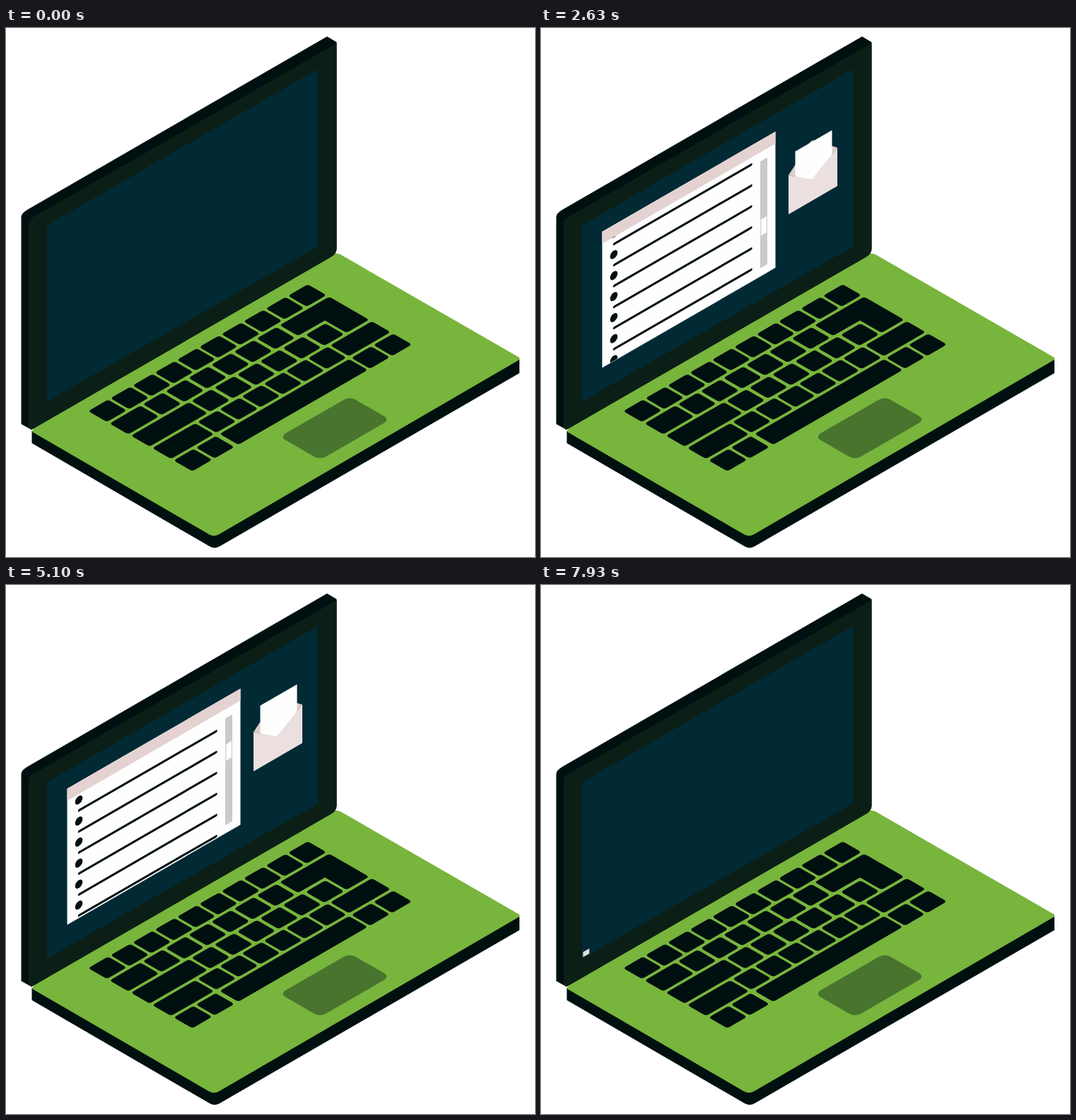
These frames come from a looping animation (748 px wide and 748 px high, 8.01 s). An HTML page:

```html
<!DOCTYPE html>
<html lang="en">
<head>
<meta charset="utf-8">
<title>Laptop</title>
<style>
html, body { margin: 0; width: 100%; height: 100%; overflow: hidden; background: #fff; }
svg { display: block; width: 100vw; height: 100vh; }
</style>
</head>
<body>
<svg viewBox="0 0 748 748">
  <defs><clipPath id="page"><rect y="17" width="245" height="175"/></clipPath></defs>

  <!-- base -->
  <path fill="#000f10" d="M36.500 570V587L288 733Q295 737 302 733L726 488V467L468 330Z"/>
  <path fill="#78b53c" d="M37 571L44 555L455 316L468 319Q472 319 476 322L726 466V469L302 715.500Q295 720 287 716Z"/>

  <!-- lid -->
  <path fill="#000f10" d="M21.500 267Q21.500 262 31 256.500L454 12L467.500 20V312Q467.500 319 460 323.500L36 568L21.500 560Z"/>
  <path fill="#0b1f17" d="M32 275Q32 270 39 267L467.500 21.500V312Q467.500 319 460 323.500L36 568L32 565Z"/>
  <path fill="#012a35" d="M58 279L441 58V309L58 528Z"/>

  <!-- keyboard plane: x = a + b, y = .577 (b - a) -->
  <g transform="matrix(1 -.5774 1 .5774 0 0)">
    <g id="keys" fill="#000f10"></g>
    <path fill="#000f10" d="M-167 557.400H-104Q-100.500 557.400 -100.500 561V610Q-100.500 614 -104 614H-129Q-132.500 614 -132.500 610V583.500H-167Q-170.500 583.500 -170.500 580V561Q-170.500 557.400 -167 557.400Z"/>
    <rect x="-307" y="694" width="99" height="57" rx="8" fill="#48742e"/>
  </g>

  <g id="list">
    <g transform="matrix(1 -.5774 0 1 86.500 288)">
      <rect width="245" height="192.500" fill="#fefefe"/>
      <rect width="245" height="17" fill="#e4d2d1"/>
      <g clip-path="url(#page)"><g id="rows" fill="#000f10" stroke="#000f10"></g></g>
      <rect x="223.500" y="29.700" width="10" height="151" fill="#c9cbcb"/>
      <rect id="thumb" x="224.500" width="8" height="23" fill="#fefefe" stroke="#dedede"/>
    </g>
  </g>

  <g id="mail">
    <path fill="#dfcdcc" d="M350 208L380 162Q385 156 390 161L419 169L383 214Z"/>
    <path id="paper" fill="#fefefe" d="M359.500 30L411.500 0V70L359.500 100Z"/>
    <path fill="#ebe0df" d="M350 208L383 214L419 169V223.500L350 263.500Z"/>
  </g>
</svg>
<script>
const $ = id => document.getElementById(id);
const LOOP = 4005, ROW = 29.7, LEFT = -411, RIGHT = -100.5;

// keys
let keys = '';
function key(row, from, to) {
  keys += `<rect x="${from}" y="${527.2 + row * 30.2}" width="${to - from}" height="26.500" rx="3.500"/>`;
}
function run(row, center, count, step) {
  for (let i = 0; i < count; i++) key(row, center + i * step - 14, center + i * step + 14);
}
run(0, -397, 10, 31.38);
key(1, LEFT, -367.5);
run(1, -350, 6, 32.2);
key(2, LEFT, -329);
run(2, -311.5, 6, 32.3);
key(3, LEFT, -350.3);
run(3, -333, 6, 31.2);
key(3, -159.5, RIGHT);
run(4, -397, 2, 31.5);
key(4, -346, -163);
run(4, -145.8, 2, 31.3);
$('keys').innerHTML = keys;

// list rows
let rows = '';
for (let i = -1; i < 8; i++) {
  const y = i * ROW;
  rows += `<ellipse cx="16.500" cy="${y}" rx="5.300" ry="5.700" stroke="none"/>
    <path d="M17 ${y + 14.8}H210.500" stroke-width="3.500" stroke-linecap="round"/>`;
}
$('rows').innerHTML = rows;

function ease(t, start, end) {
  const u = Math.min(1, Math.max(0, (t - start) / (end - start)));
  return u * u * (3 - 2 * u);
}
function zoom(id, x, y, s) {
  $(id).setAttribute('transform', `translate(${x} ${y}) scale(${s}) translate(${-x} ${-y})`);
  $(id).setAttribute('visibility', s > 0.002 ? 'visible' : 'hidden');
}

function draw() {
  const t = performance.now() % LOOP;
  zoom('list', 58.4, 528, ease(t, 67, 627) - ease(t, 3430, 3990));
  zoom('mail', 384.5, 213, ease(t, 67, 400) - ease(t, 3370, 3800));

  const scroll = 25.7 - 0.0668 * (t - 1095);
  $('rows').setAttribute('transform', `translate(0 ${(scroll % ROW + ROW) % ROW})`);
  $('thumb').setAttribute('y', 67 + 0.0295 * (t - 1095));

  // six bobs per loop, lingering at the low end
  const p = 2 * Math.PI * 6 * t / LOOP;
  const top = 146.2 + 7 * Math.sin(p) + 1.2 * Math.cos(2 * p);
  $('paper').setAttribute('transform', `translate(0 ${top})`);
  requestAnimationFrame(draw);
}
draw();
</script>
</body>
</html>
```
